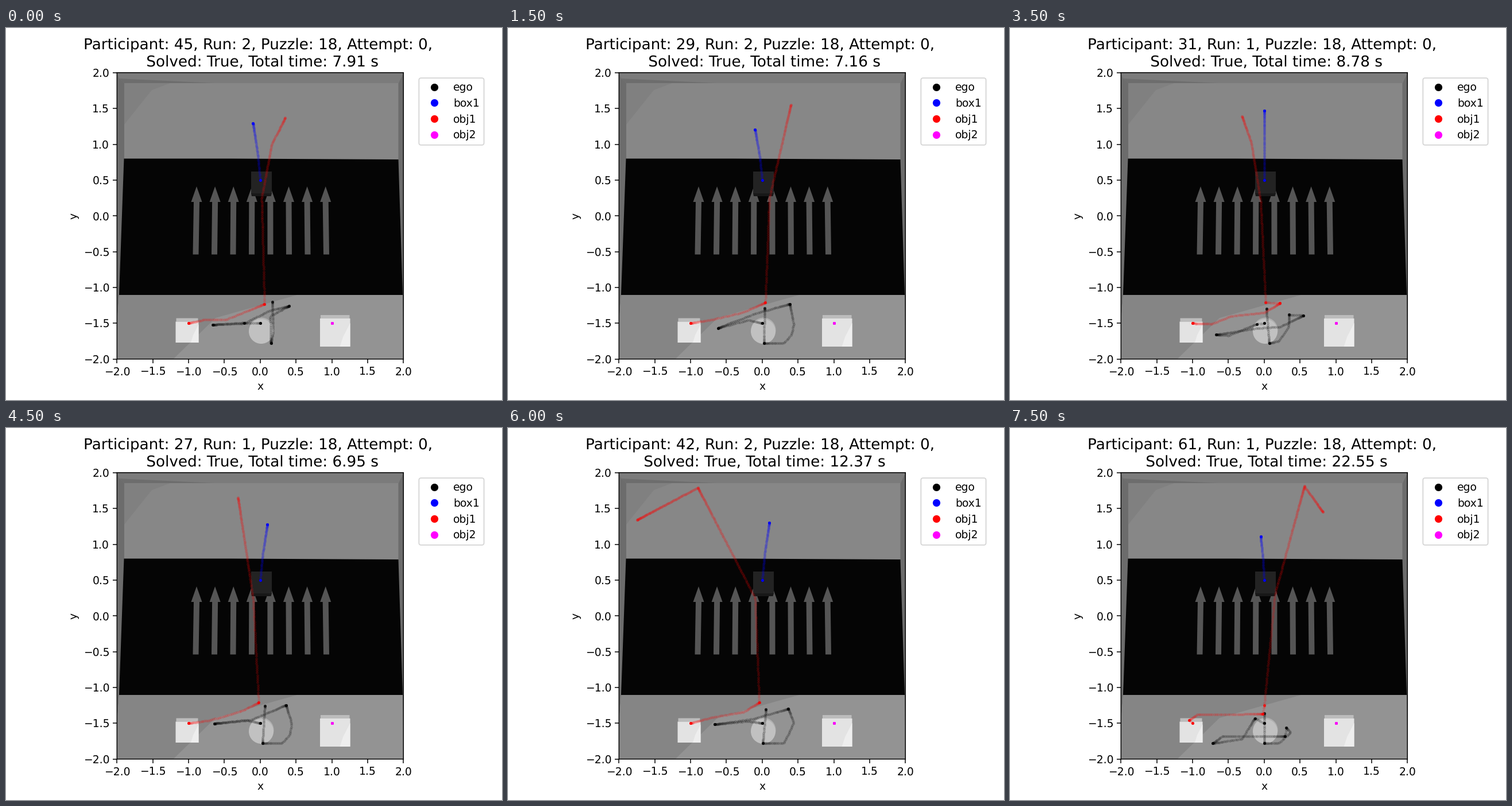
A matplotlib script for the animation above (8000 ms loop, 864 by 648 pixels).

```python
import random
import numpy as np
import matplotlib.pyplot as plt
from matplotlib.animation import FuncAnimation
from matplotlib.lines import Line2D
from matplotlib.patches import Circle, Polygon

W, H, DPI = 864, 648, 135
UNIT, CX, CY = 124.74, 442.8, 327.24   # pixels per data unit, pixel of (0, 0)

plt.rcParams.update({"path.snap": False, "text.hinting": "none"})
fig, ax = plt.subplots(figsize=(W / DPI, H / DPI), dpi=DPI)
ax.set(xlim=(-2, 2), ylim=(-2, 2), xlabel="x", ylabel="y", aspect="equal")


# ---- room, laid out in stage pixels ----

def to_data(flat):
    p = np.array(flat, float).reshape(-1, 2)
    return np.column_stack([(p[:, 0] - CX) / UNIT, (CY - p[:, 1]) / UNIT])


def poly(color, *flat):
    ax.add_patch(Polygon(to_data(flat), fc=color, ec="none", lw=0, zorder=0.1))


def rect(color, x0, y0, x1, y1):
    poly(color, x0, y0, x1, y0, x1, y1, x0, y1)


def disc(color, x, y, r):
    ax.add_patch(Circle(to_data((x, y))[0], r / UNIT, fc=color, lw=0, zorder=0.1))


def cube(x0, y0, x1, y1, lid):
    rect("#bcbcbc", x0 + 1, y0, x1 - 1, y0 + lid)
    rect("#e3e3e3", x0, y0 + lid, x1, y1)
    w, h = x1 - x0, y1 - y0
    poly("#eeeeee", x1, y0 + 0.25 * h, x1, y1, x1 - 0.34 * w, y1, x1 - 0.24 * w, y1 - 0.3 * h)


def draw_room():
    rect("#6c6c6c", 193, 77, 693, 578)
    poly("#7b7b7b", 193, 77, 693, 77, 684, 96, 206, 96, 197, 88)
    poly("#6d6d6d", 197, 88, 362, 96, 206, 96)
    rect("#878787", 206, 96, 683.5, 229)
    poly("#808080", 206, 96, 286, 96, 254, 108, 206, 168)
    poly("#050505", 205.5, 227.5, 393, 227.5, 683.5, 229, 691, 465, 197, 465)
    poly("#939393", 197, 465, 691, 465, 693, 578, 193, 578, 193, 520)
    poly("#858585", 197, 465, 507, 465, 365, 505, 290, 578, 193, 578, 193, 520)
    for i in range(8):
        tip, foot = 332 + 32.1 * i, 330.5 + 32.5 * i
        poly("#555555", tip, 276, tip + 9.5, 303, tip - 9.5, 303)
        poly("#555555", tip - 5, 303, tip + 5, 303, foot + 5, 394.5, foot - 5, 394.5)
    rect("#232323", 427, 250, 463, 289)
    poly("#181818", 427, 288, 463, 288, 461.5, 293, 428, 293)
    cube(295.5, 505.5, 335.5, 548, 6)
    cube(547, 500, 599.5, 555, 6)
    disc("#b0b0b0", 445, 526, 21.5)
    disc("#c1c1c1", 444.5, 528.5, 21.5)


# ---- trails, in data units ----

def start_stop(t):
    return t * t * (3 - 2 * t)


def slow_down(t):
    return 1 - (1 - t) ** 1.4


def glide(points, gap, ease):
    """Dots along a polyline, spaced by the eased speed."""
    p = np.array(points, float).reshape(-1, 2)
    dist = np.r_[0, np.cumsum(np.hypot(*np.diff(p, axis=0).T))]
    s = dist[-1] * ease(np.linspace(0, 1, max(3, int(dist[-1] / gap))))
    return np.column_stack([np.interp(s, dist, p[:, k]) for k in (0, 1)])


def rest(x, y, n=12):
    return np.tile([x, y], (n, 1))


def walk(start, strokes, gap=0.018):
    """Chained strokes with a short halt after each one."""
    parts, here = [rest(*start)], start
    for stroke in strokes:
        parts.append(glide((*here, *stroke), gap, start_stop))
        here = stroke[-2:]
        parts.append(rest(*here, 5))
    return np.vstack(parts), here


def scene(who, run, time, box, carry, flight, ego, bounce=None, gap=0.025, attempt=0):
    title = (f"Participant: {who}, Run: {run}, Puzzle: 18, Attempt: {attempt}, \n"
             f" Solved: True, Total time: {time} s")
    bend = (0.35 * box[0], 0.55 + 0.4 * (box[1] - 0.5))
    pushed = np.vstack([rest(0, 0.5), glide((0, 0.5, *bend, *box), 0.016, slow_down), rest(*box)])
    carried, launch = walk((-1, -1.5), carry)
    obj = [carried, glide((*launch, *flight), gap, slow_down)]
    if bounce:
        obj.append(glide((*flight[-2:], *bounce), 0.012, slow_down))
    return title, walk((0, -1.5), ego)[0], pushed, np.vstack(obj)


def typical(seed, who, run, time, hit, bounce=None, **kw):
    """Fetch the object, launch it over the box, circle back."""
    rng = random.Random(seed)
    j = lambda v, d=0.05: v + rng.uniform(-d, d)
    side = np.sign(hit[0])
    carry = [(-0.7, j(-1.46), j(-0.3), j(-1.38), j(0), -1.21)]
    ego = [(-0.2, j(-1.48), j(-0.66), j(-1.52)), (j(-0.1), j(-1.41), j(0.37), j(-1.27)),
           (0.44, j(-1.48), j(0.41), -1.66, 0.3, -1.78, j(0.05), -1.78), (j(0.03), j(-1.3))]
    return scene(who, run, time, (-0.1 * side, j(1.3, 0.1)), carry,
                 (0.1 * side, 0.25, *hit), ego, bounce, **kw)


scenes = [
    scene(45, 2, "7.91", (-0.1, 1.29),
          [(-0.78, -1.45, -0.48, -1.45, 0.06, -1.23)],
          (0.02, 0.25, 0.16, 1.0, 0.35, 1.37),
          [(-0.22, -1.5), (-0.66, -1.52), (-0.2, -1.49, 0.14, -1.32, 0.4, -1.26),
           (0.14, -1.4, 0.15, -1.78), (0.18, -1.63, 0.17, -1.2)]),
    typical(3, 52, 1, "7.35", (0.3, 1.5)),
    scene(37, 2, "8.0", (0.13, 1.27),
          [(-1.25, -1.49), (-1, -1.43, -0.34, -1.33, -0.2, -1.33, 0.02, -1.21)],
          (-0.15, 0.22, -0.59, 1.8),
          [(-0.02, -1.36, -0.65, -1.41, -0.9, -1.48), (-0.2, -1.45, 0.38, -1.2),
           (0.49, -1.42, 0.52, -1.6, 0.4, -1.73, -0.05, -1.75)],
          bounce=(-1.25, 1.61), gap=0.055),
    typical(5, 29, 2, "7.16", (0.4, 1.55)),
    typical(8, 45, 1, "6.73", (-0.25, 1.7)),
    scene(36, 1, "9.76", (-0.01, 1.82),
          [(-1.05, -1.46), (-0.5, -1.32, -0.13, -1.21), (-0.1, -1.3, 0.07, -1.26), (0.13, -1.31)],
          (0.1, 0.3, 0, 1.5),
          [(0.01, -1.38), (-0.06, -1.21), (0, -1.4, -0.18, -1.67, -0.42, -1.78, -0.77, -1.78),
           (-0.42, -1.78, -0.08, -1.64), (0.14, -1.53, 0.16, -1.62, 0.36, -1.6),
           (0.34, -1.78), (-0.03, -1.78)],
          bounce=(0.12, 1.4, 0.31, 1.01), gap=0.05),
    typical(11, 33, 1, "11.42", (-0.42, 1.66), (-0.74, 1.42)),
    scene(31, 1, "8.78", (0, 1.47),
          [(-0.74, -1.51, -0.46, -1.4, 0, -1.35, 0.22, -1.22), (0.02, -1.21)],
          (-0.05, 0.2, -0.18, 1.02, -0.31, 1.39),
          [(-0.1, -1.51), (-0.5, -1.67, -0.67, -1.66), (-0.1, -1.57, 0.22, -1.55, 0.55, -1.39),
           (0.35, -1.38), (0.34, -1.55, 0.2, -1.75, 0.07, -1.78), (0.03, -1.3)]),
    typical(14, 58, 2, "9.21", (0.94, 1.79), (1.77, 1.42)),
    typical(17, 27, 1, "6.95", (-0.31, 1.65)),
    typical(20, 48, 2, "7.54", (0.3, 1.68), attempt=1),
    scene(42, 2, "6.48", (0.03, 1.78),
          [(-1.05, -1.48), (-0.78, -1.38, -0.05, -1.17)],
          (0, 0.3, 0.04, 1.47),
          [(-0.2, -1.5, -0.68, -1.55), (-0.34, -1.41, 0.32, -1.23),
           (0.43, -1.43, 0.44, -1.67, 0.25, -1.78), (-0.08, -1.78, -0.12, -1.21)]),
    typical(23, 42, 2, "12.37", (-0.9, 1.79), (-1.75, 1.34)),
    scene(42, 1, "5.88", (0.12, 1.28),
          [(-0.74, -1.44, -0.08, -1.38), (0, -1.33), (-0.05, -1.16)],
          (-0.14, 0.22, -0.65, 1.82),
          [(-0.17, -1.46, -0.68, -1.5), (0, -1.42, 0.34, -1.33),
           (0.44, -1.46, 0.42, -1.65, 0.3, -1.78, 0.04, -1.78, 0.02, -1.5, 0.11, -1.2)],
          bounce=(-1.02, 1.52)),
    typical(26, 55, 2, "6.12", (-0.2, 1.7)),
    scene(61, 1, "22.55", (-0.05, 1.11),
          [(-1.05, -1.46), (-0.94, -1.38, -0.02, -1.37), (0, -1.25)],
          (0.15, 0.3, 0.56, 1.81),
          [(-0.13, -1.43), (-0.24, -1.6, -0.31, -1.72, -0.72, -1.78),
           (-0.58, -1.68, 0.29, -1.68), (0.31, -1.56), (0.37, -1.63, 0.2, -1.78, 0, -1.78),
           (0, -1.36)],
          bounce=(0.82, 1.45)),
]

draw_room()
colors = {"ego": "black", "box1": "blue", "obj1": "red", "obj2": "magenta"}
dots = [ax.plot([], [], "o", color=c, ms=2.6, mew=0, alpha=0.2, zorder=2)[0]
        for c in colors.values()]
dots[3].set_data(*rest(1, -1.5, 40).T)
handles = [Line2D([], [], ls="", marker="o", ms=6, color=c, label=name)
           for name, c in colors.items()]
ax.legend(handles=handles, loc="upper right", bbox_to_anchor=(1.3, 1.0))
title = ax.set_title("", fontsize=14)


def update(i):
    text, *trails = scenes[i]
    title.set_text(text)
    for dot, trail in zip(dots, trails):
        dot.set_data(*trail.T)
    return dots + [title]


anim = FuncAnimation(fig, update, frames=len(scenes), interval=500,
                     repeat=True, repeat_delay=0, blit=False)
plt.show()
```
